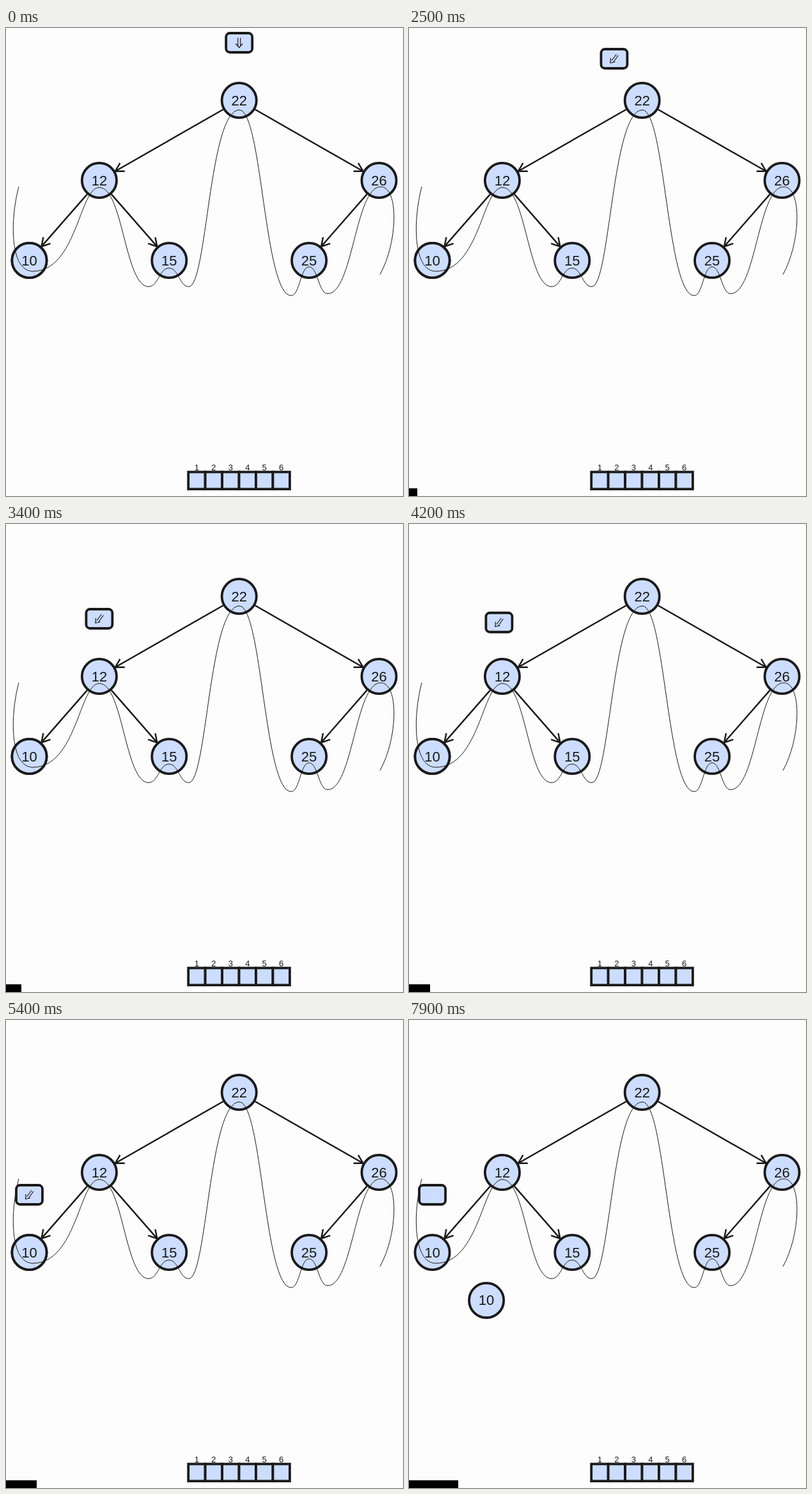
Write an HTML page that moves like this. It is 621 px wide and 731 px high and loops after 8 s.

```html
<!DOCTYPE html>
<html lang="en">
<head>
<meta charset="utf-8">
<title>In-order traversal</title>
<style>
  html, body { margin: 0; width: 100%; height: 100%; overflow: hidden; background: #fdfdfd; }
  svg { display: block; width: 100vw; height: 100vh; }
  text { font-family: "Liberation Sans", Arial, sans-serif; text-anchor: middle; fill: #1a1a1a; }
  .shape { fill: #ccddff; stroke: #1a1a1a; stroke-width: 3.8; }
  .edge { fill: none; stroke: #1a1a1a; stroke-width: 2.4; }
  .thin { fill: none; stroke: #1a1a1a; stroke-width: 1; }
  .glyph { fill: none; stroke: #1c1418; stroke-width: 1.2; }
</style>
</head>
<body>
<svg id="stage" viewBox="0 0 621 731"></svg>
<script>
const LOOP = 8000, STEP = 100, R = 27.1, CELL = 26.45;
const stage = document.getElementById('stage');

function add(tag, attrs, parent = stage, text = '') {
  const el = document.createElementNS('http://www.w3.org/2000/svg', tag);
  for (const key in attrs) el.setAttribute(key, attrs[key]);
  el.textContent = text;
  parent.appendChild(el);
  return el;
}

// Columns follow the sorted order, rows follow the depth.
const depth = { 10: 2, 12: 1, 15: 2, 22: 0, 25: 2, 26: 1 };
const nodes = {};
Object.keys(depth).forEach((label, i) => {
  nodes[label] = [36.5 + 109.4 * i, 113 + 125 * depth[label]];
});

function addEdge([x1, y1], [x2, y2]) {
  const a = Math.atan2(y2 - y1, x2 - x1), gap = R + 1.6;
  const ray = (x, y, angle, length) =>
    `${x + length * Math.cos(angle)},${y + length * Math.sin(angle)}`;
  const tip = ray(x2, y2, a, -gap);
  const [tx, ty] = tip.split(',').map(Number);
  add('path', {
    class: 'edge',
    d: `M${ray(x1, y1, a, gap)}L${tip}M${ray(tx, ty, a - 0.52, -15)}L${tip}L${ray(tx, ty, a + 0.52, -15)}`
  });
}

function addNode(label) {
  const g = add('g', { transform: `translate(${nodes[label]})` });
  add('circle', { class: 'shape', r: R }, g);
  add('text', { y: 7.5, 'font-size': 22 }, g, label);
  return g;
}

for (const pair of ['22 12', '22 26', '12 10', '12 15', '26 25']) {
  const [from, to] = pair.split(' ');
  addEdge(nodes[from], nodes[to]);
}
for (const label in nodes) addNode(label);
const copy = addNode('10');

const cursor = add('g', {});
add('rect', { class: 'shape', x: -20.5, y: -15, width: 41, height: 30, rx: 6 }, cursor);
const down = add('path', { class: 'glyph', d: 'M-2,-7.5V4.5M2,-7.5V4.5M-5.5,1.5L0,7.5L5.5,1.5' }, cursor);
const left = add('path', { class: 'glyph', d: 'M3.5,-7L-4,3M6.5,-5.5L-1,5M-5.5,-1L-6,6.5L1.5,5' }, cursor);

for (let i = 0; i < 6; i++) {
  const x = 285.2 + i * CELL;
  add('rect', { class: 'shape', x, y: 693.5, width: CELL, height: 26.7 });
  add('text', { x: x + CELL / 2, y: 691, 'font-size': 13 }, stage, i + 1);
}

// Turning points of the wave: x, y and the sideways lean of the stroke that follows.
const turns = [
  [42, 380, 0.18], [146, 249], [223, 404], [255, 375], [286, 404, -0.12],
  [365, 128, -0.04], [446, 418], [474, 373], [503, 415], [586, 248]
];
let wave = 'M20,248C6,300 6,380 42,380';
for (let i = 1; i < turns.length; i++) {
  const [x1, y1, lean = 0] = turns[i - 1], [x2, y2] = turns[i], dx = x2 - x1;
  wave += `C${x1 + dx * (0.48 + lean)},${y1} ${x2 - dx * (0.48 - lean)},${y2} ${x2},${y2}`;
}
add('path', { class: 'thin', d: wave + 'C615,248 613,335 585,385' });

const bar = add('rect', { x: 0, y: 719, height: 12, width: 0, fill: '#000' });

const ramp = (t, from, to) => Math.min(1, Math.max(0, (t - from) / (to - from)));
const mix = (p, q, k) => p.map((v, i) => v + (q[i] - v) * k);
const place = (el, [x, y]) => el.setAttribute('transform', `translate(${x},${y})`);

function draw(time) {
  const t = Math.floor(time / STEP) * STEP;
  const onRoot = mix(nodes[22], nodes[12], ramp(t, 2298, 3308));
  const [x, y] = mix(onRoot, nodes[10], ramp(t, 4162, 4990));
  place(cursor, [x, y - 90]);
  down.setAttribute('opacity', t < 1500 ? 1 : 0);
  left.setAttribute('opacity', t < 1500 ? 0 : 1 - ramp(t, 5900, 6600));

  const moved = Math.max(0, t - 7450);
  place(copy, [nodes[10][0] + 0.188 * moved, nodes[10][1] + 0.1665 * moved]);
  bar.setAttribute('width', t < 1500 ? 0 : Math.round(1.2 + 0.0119 * (t - 1500)));
}

const start = performance.now();
function tick() {
  draw((performance.now() - start) % LOOP);
  requestAnimationFrame(tick);
}
tick();
</script>
</body>
</html>
```
